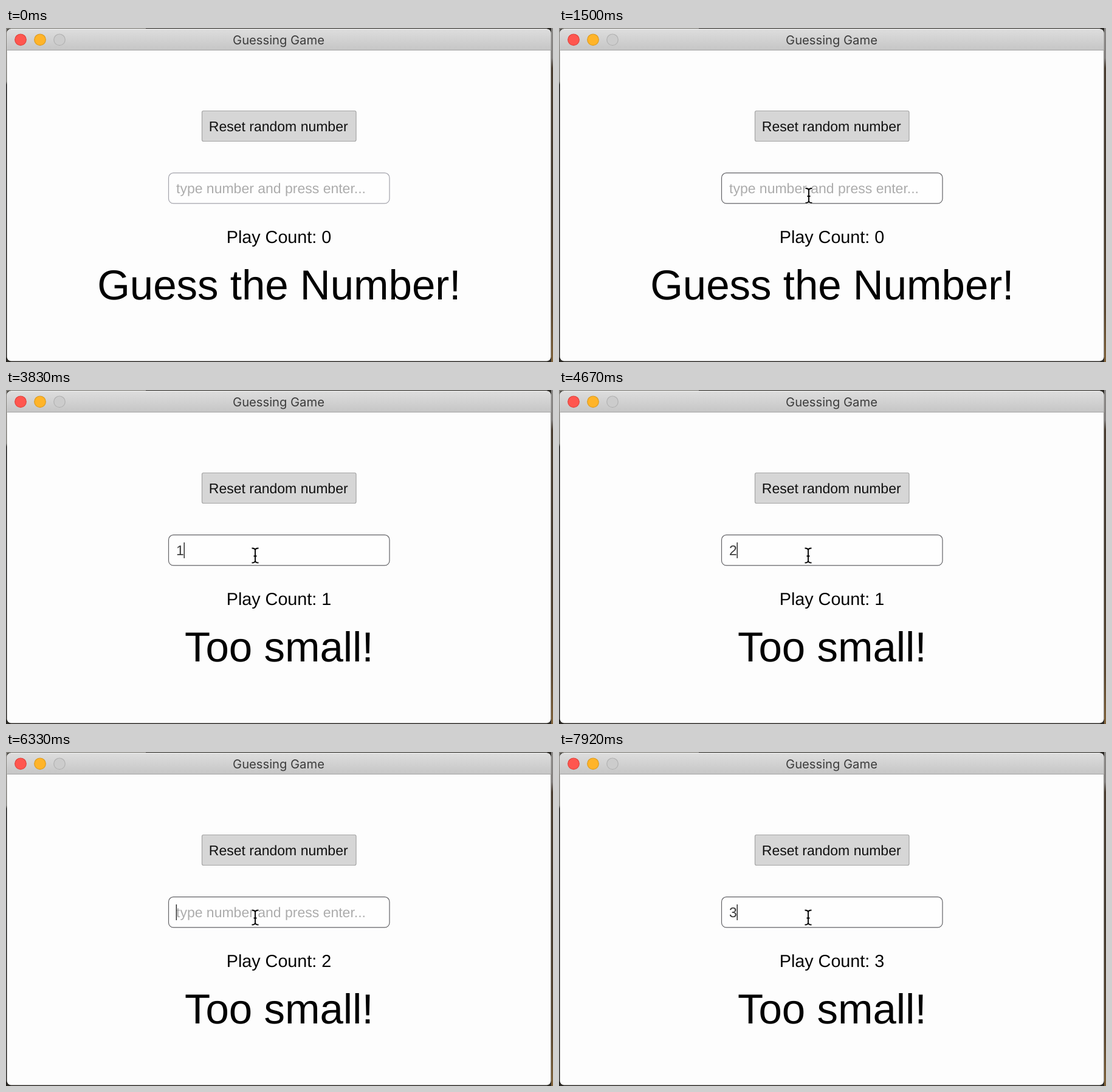
Recreate the animation shown at these times as an HTML page with a canvas. Size 900 by 550 pixels, loop 8 s.

```html
<!DOCTYPE html>
<html lang="en">
<head>
<meta charset="utf-8">
<title>Guessing Game</title>
<style>
  html, body { margin: 0; width: 100%; height: 100%; overflow: hidden; background: #2b2925; }
  canvas { display: block; width: 900px; height: 550px; }
</style>
</head>
<body>
<canvas id="stage" width="900" height="550"></canvas>
<script>
const ctx = document.getElementById('stage').getContext('2d');
const LOOP = 8000;
const SANS = '"Liberation Sans", Arial, sans-serif';
const PAPER = '#fdfdfd';
const POINT = 2.875; // pixels per point of the app's font sizes

// Each entry takes effect at its time and holds until the next one.
const inputSteps = [[0, ''], [2580, '1'], [4250, ''], [4500, '2'], [6080, ''], [6720, '3']];
const countSteps = [[0, 0], [3250, 1], [5330, 2], [7420, 3]];
const FOCUS = 1830;
const HOVER = 1170;

const stepAt = (steps, t) => steps.filter(s => s[0] <= t).pop();

function text(str, x, y, size, color, align = 'left', family = SANS) {
  ctx.font = `${size}px ${family}`;
  ctx.textRendering = 'geometricPrecision';
  ctx.textAlign = align;
  ctx.fillStyle = color;
  ctx.fillText(str, x, y);
}

function box(x, y, w, h, radius, fill, stroke) {
  ctx.beginPath();
  ctx.roundRect(x, y, w, h, radius);
  ctx.fillStyle = fill;
  ctx.fill();
  if (stroke) {
    ctx.strokeStyle = stroke;
    ctx.lineWidth = 1.2;
    ctx.stroke();
  }
}

function gradient(y0, y1, ...stops) {
  const g = ctx.createLinearGradient(0, y0, 0, y1);
  stops.forEach(([at, color]) => g.addColorStop(at, color));
  return g;
}

function drawDesktop() {
  ctx.fillStyle = '#2b2925';
  ctx.fillRect(0, 0, 900, 550);
  ctx.fillStyle = '#77756f';
  ctx.fillRect(0, 0, 230, 2);
  ctx.fillStyle = gradient(0, 550, [0, '#8a8884'], [0.16, '#777570'], [0.17, '#131211'], [1, '#262421']);
  ctx.fillRect(0, 0, 2, 550);
  ctx.fillStyle = gradient(0, 550, [0, '#8c8a88'], [0.09, '#858280'], [0.12, '#4a3d30'],
    [0.5, '#443a2e'], [0.85, '#5c4830'], [1, '#82643c']);
  ctx.fillRect(897, 0, 3, 550);
}

function drawWindow() {
  box(1.5, 1.5, 895, 547, 7, PAPER);
  box(1.5, 1.5, 895, 35, [7, 7, 0, 0], gradient(1, 36, [0, '#dedede'], [1, '#c6c6c6']));
  ctx.fillStyle = '#ededed';
  ctx.fillRect(8, 1.5, 882, 1);
  ctx.fillStyle = '#a5a5a5';
  ctx.fillRect(1.5, 36, 895, 1);
  [[24, '#ff564f', '#e0443e'], [56, '#ffb429', '#dd9c20'], [88, '#cccccc', '#b2b2b2']]
    .forEach(([x, fill, edge]) => box(x - 9.3, 10, 18.6, 18.6, 9.3, fill, edge));
  text('Guessing Game', 448.5, 26.8, 20.2, '#3c3c3c', 'center', 'Inter, Roboto, sans-serif');
}

function drawField(t) {
  const [since, value] = stepAt(inputSteps, t);
  box(267.5, 238.7, 363.5, 50.2, 8, '#fefefe', t < HOVER ? '#a2a2aa' : '#626266');
  if (value) text(value, 280, 272, 8 * POINT, '#3a3a3a');
  else text('type number and press enter...', 280, 272, 8 * POINT, '#acacac');
  const blink = t - Math.max(since, FOCUS);
  if (blink >= 0 && blink % 1000 < 500) {
    ctx.fillStyle = '#303030';
    ctx.fillRect(value ? 292.5 : 279.6, 251, 1.5, 26);
  }
}

function drawBeam(x, y) {
  ctx.beginPath();
  for (const s of [-1, 1]) {
    ctx.moveTo(x - 5.5, y + s * 12);
    ctx.quadraticCurveTo(x, y + s * 12, x, y + s * 8.5);
    ctx.quadraticCurveTo(x, y + s * 12, x + 5.5, y + s * 12);
  }
  ctx.moveTo(x, y - 9);
  ctx.lineTo(x, y + 9);
  ctx.moveTo(x - 2.5, y + 1);
  ctx.lineTo(x + 2.5, y + 1);
  for (const [width, color] of [[4, PAPER], [1.9, '#050505']]) {
    ctx.lineWidth = width;
    ctx.strokeStyle = color;
    ctx.stroke();
  }
}

function drawArrow(x, y) {
  const points = [[0, 0], [0, 23], [5.2, 18.3], [8.8, 26.5], [12.6, 24.8], [9, 16.8], [16, 16.4]];
  ctx.beginPath();
  points.forEach(([dx, dy]) => ctx.lineTo(x + dx, y + dy));
  ctx.closePath();
  ctx.lineWidth = 3;
  ctx.strokeStyle = PAPER;
  ctx.stroke();
  ctx.fillStyle = '#050505';
  ctx.fill();
}

function drawPointer(t) {
  const enter = 920;
  if (t < enter) return;
  const p = Math.min(1, (t - enter) / 420);
  const ease = 1 - (1 - p) ** 3;
  const settle = Math.max(0, Math.min(1, (t - 1550) / 200));
  const x = 430 - 19 * ease - settle;
  const y = 548 - 272 * ease - 3.5 * settle;
  if (y < 289) drawBeam(x, y);
  else drawArrow(x, y);
}

function draw(t) {
  const count = stepAt(countSteps, t)[1];
  drawDesktop();
  drawWindow();
  box(322.5, 136.5, 253.5, 50, 2.5, '#d6d6d6', '#a4a4a4');
  text('Reset random number', 448.2, 169.5, 8 * POINT, '#101010', 'center');
  drawField(t);
  text('Play Count: ' + count, 449, 353.7, 10 * POINT, '#050505', 'center');
  text(count ? 'Too small!' : 'Guess the Number!', 449.3, 447.4, 24 * POINT, '#000', 'center');
  drawPointer(t);
}

function tick() {
  draw(performance.now() % LOOP);
  requestAnimationFrame(tick);
}
tick();
</script>
</body>
</html>
```
